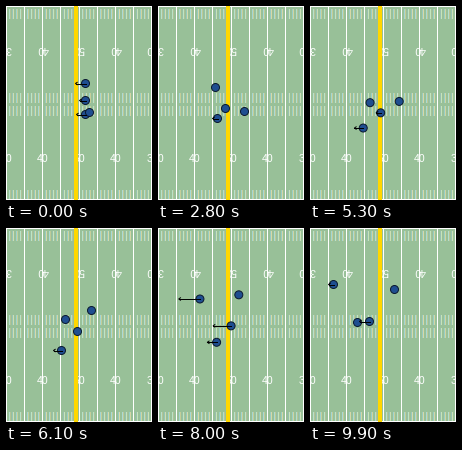
Write a matplotlib script that moves like this. It is 146 px wide and 194 px high and loops after 10 s.

```python
import numpy as np
import matplotlib.pyplot as plt
from matplotlib.animation import FuncAnimation
from matplotlib.patches import Circle, Rectangle

W, H, DPI = 146, 194, 100
FRAMES, STEP = 100, 100
PX = 72 / DPI
YARD = W / 40
GREEN = np.array([152, 192, 152]) / 255

KNOTS = np.array([0, 2.2, 2.8, 4.4, 6.1, 7.1, 7.7, 8.9, 9.9])
times = np.arange(FRAMES) * STEP / 1000


def smooth(values):
    """Cubic Hermite curve through the values at KNOTS, one sample per frame."""
    v = np.array(values, float)
    m = np.gradient(v, KNOTS)
    i = np.clip(np.searchsorted(KNOTS, times, side="right") - 1, 0, len(v) - 2)
    h = KNOTS[i + 1] - KNOTS[i]
    u = (times - KNOTS[i]) / h
    return ((1 + 2 * u) * (1 - u) ** 2 * v[i] + u * (1 - u) ** 2 * h * m[i]
            + u ** 2 * (3 - 2 * u) * v[i + 1] - u ** 2 * (1 - u) * h * m[i + 1])


fig = plt.figure(figsize=(W / DPI, H / DPI), dpi=DPI, facecolor=GREEN)
ax = fig.add_axes([0, 0, 1, 1])
ax.set_xlim(0, W)
ax.set_ylim(H, 0)
ax.axis("off")


def box(x, y, w, h, color, z=1):
    ax.add_patch(Rectangle((x, y), w, h, color=color, lw=0, zorder=z, antialiased=False))


def draw_hashes():
    # Each tick is spread over the red, green and blue subpixels
    for yard in range(1, 40):
        if yard % 5 == 0:
            continue
        pos = yard * YARD
        for col in range(int(pos) - 1, int(pos) + 2):
            sub = col + (np.arange(3) + 0.5) / 3
            cover = 0.62 * np.clip(1 - np.abs(sub - pos) / 0.9, 0, 1)
            if cover.max() > 0.1:
                for top in (3, 87, 100, 184):
                    box(col, top, 1, 10, GREEN + (1 - GREEN) * cover)


def draw_field():
    draw_hashes()
    for k in range(9):
        box(min(int(k * 5 * YARD), W - 1), 0, 1, H, "white", 2)
    for y in (0, H - 1):
        box(0, y, W, 1, "white", 2)
    for k in range(5):
        label = str(50 - 10 * abs(k - 2))
        for y, turn in ((43, 180), (152.5, 0)):
            ax.text(k * 10 * YARD, y, label, color="white", rotation=turn,
                    family="Liberation Sans", fontsize=10.5 * PX,
                    ha="center", va="center", zorder=3)
    box(68, 0, 4, H, "#ffd700", 4)


class Player:
    """Dot with an arrow to the left; the arrow length follows its own curve."""

    def __init__(self, x, y, reach=None):
        self.x, self.y = smooth(x) + 0.5, smooth(y) + 0.5
        self.reach = np.zeros(FRAMES) if reach is None else smooth(reach)
        self.dot = ax.add_patch(Circle((0, 0), 4, fc="#1f4e90", ec="#0b1a30",
                                       lw=PX, zorder=5))
        self.shaft, = ax.plot([], [], color="black", lw=PX, zorder=6)
        self.head, = ax.plot([], [], color="black", lw=PX, zorder=6)

    def show(self, i):
        x, y, reach = self.x[i], self.y[i], self.reach[i]
        tip = x - reach
        self.dot.center = x, y
        self.shaft.set_data([tip, x], [y, y])
        self.head.set_data([tip + 1.7, tip, tip + 1.7], [y - 1.2, y, y + 1.2])
        for part in (self.shaft, self.head):
            part.set_visible(reach > 1)


draw_field()
top = Player([79, 57.5, 57, 59, 59, 56, 46, 30, 23],
             [77, 79, 81, 96, 91, 77, 72, 67, 56],
             [10, 5, 0, 0, 0, 15, 20, 19, 5])
middle = Player([79, 70, 67, 70, 71, 75, 74, 66, 59],
                [94, 100, 102, 108, 103, 98, 97, 99, 93],
                [6, 3, 0, 12, 0, 11, 16, 20, 10])
bottom = Player([79, 54.5, 59, 53, 55, 62, 60, 51, 47],
                [108, 112, 112, 119, 122, 119, 116, 105, 94],
                [9, 18, 5, 10, 8, 11, 10, 6, 0])
back = Player([83, 83, 86, 91, 85, 80, 80, 82, 84],
              [106, 105, 105, 106, 82, 67, 65.5, 70, 61])
players = top, middle, bottom, back


def update(i):
    for player in players:
        player.show(i)
    return []


anim = FuncAnimation(fig, update, frames=FRAMES, interval=STEP,
                     init_func=lambda: update(0), repeat=True, repeat_delay=0)
plt.show()
```
